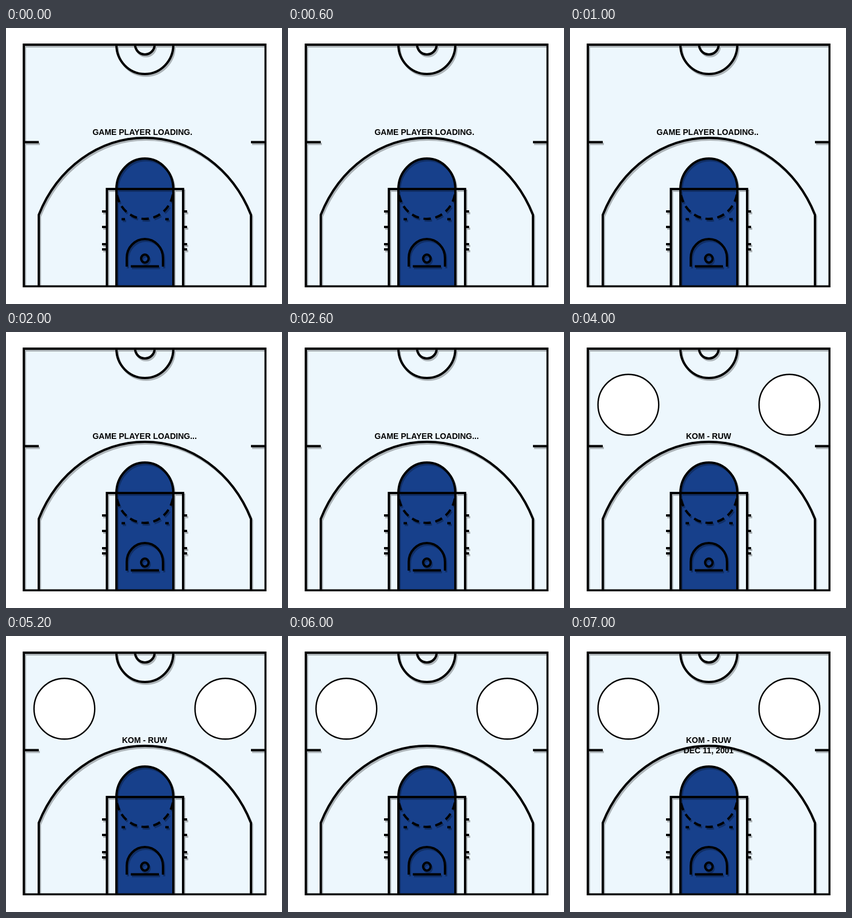
Animation, 480 px wide and 480 px high, one loop 8 s. Source, as an HTML page:

```html
<!DOCTYPE html>
<html lang="en">
<head>
<meta charset="utf-8">
<title>Game player</title>
<style>
  html, body { margin: 0; width: 100%; height: 100%; overflow: hidden; background: #fff; }
  svg { display: block; width: 480px; height: 480px; }
  .lines { fill: none; stroke: #000; stroke-width: 4; filter: drop-shadow(2px 3px .7px rgba(0, 0, 0, .27)); }
  .paint { fill: #17408b; }
  .badge { fill: #fff; stroke: #000; stroke-width: 2.4; }
  text { font: bold 14px "Liberation Sans", Arial, sans-serif; fill: #000; }
  .mid { text-anchor: middle; }
</style>
</head>
<body>
<svg viewBox="0 0 480 480">
  <clipPath id="edge"><rect x="29" y="27" width="424" height="424"/></clipPath>
  <g clip-path="url(#edge)">
    <rect x="31" y="29" width="420.5" height="420.5" fill="#edf7fd"/>
    <path class="paint" d="M192 449.5V280A49.5 53 0 0 1 291 280V449.5Z"/>
    <g class="lines">
      <rect x="31" y="29" width="420.5" height="420.5"/>
      <path d="M192 29A49.5 51 0 0 0 291 29M224.5 29A17 17 0 0 0 258.5 29"/>
      <path d="M31 198.5H57M426 198.5H451"/>
      <path d="M57 449.5V325A202 226 0 0 1 426 325V449.5"/>
      <path d="M175.5 449.5V280H308V449.5M192 449.5V280A49.5 53 0 0 1 291 280V449.5"/>
      <path d="M192 280A49.5 52 0 0 0 291 280" stroke-dasharray="13 8" stroke-dashoffset="10.4"/>
      <path id="ticks"/>
      <path d="M201 332.5H207M277 332.5H283"/>
      <path d="M210 415V400A31.5 33 0 0 1 273 400V415M217 414.5H266"/>
      <ellipse cx="241.5" cy="401" rx="6.5" ry="7"/>
    </g>
  </g>
  <g id="badges" class="badge">
    <circle cx="101.5" cy="126.5" r="52.8"/>
    <circle cx="381.5" cy="126.5" r="52.8"/>
  </g>
  <text id="loading" x="150.4" y="186"></text>
  <text id="teams" class="mid" x="241" y="186"></text>
  <text id="date" class="mid" x="241" y="204"></text>
</svg>
<script>
  const LOOP = 8000;
  const byId = id => document.getElementById(id);
  const [ticks, badges, loading, teams, date] =
    ["ticks", "badges", "loading", "teams", "date"].map(byId);

  ticks.setAttribute("d", [319, 346, 376, 385]
    .map(y => `M167 ${y}H175M308 ${y}H315`).join(""));

  const wait = "GAME PLAYER LOADING";
  const match = "KOM - RUW";
  const steps = [
    { at: 0, loading: wait + "." },
    { at: 1000, loading: wait + ".." },
    { at: 2000, loading: wait + "..." },
    { at: 3000 },
    { at: 4000, badges: true, teams: match },
    { at: 6000, badges: true },
    { at: 7000, badges: true, teams: match, date: "DEC 11, 2001" }
  ];

  let shown;
  function show(step) {
    if (step === shown) return;
    shown = step;
    loading.textContent = step.loading || "";
    teams.textContent = step.teams || "";
    date.textContent = step.date || "";
    badges.style.display = step.badges ? "" : "none";
  }

  const start = performance.now();
  function tick() {
    const t = (performance.now() - start) % LOOP;
    show(steps.filter(s => s.at <= t).pop());
    requestAnimationFrame(tick);
  }
  tick();
</script>
</body>
</html>
```
